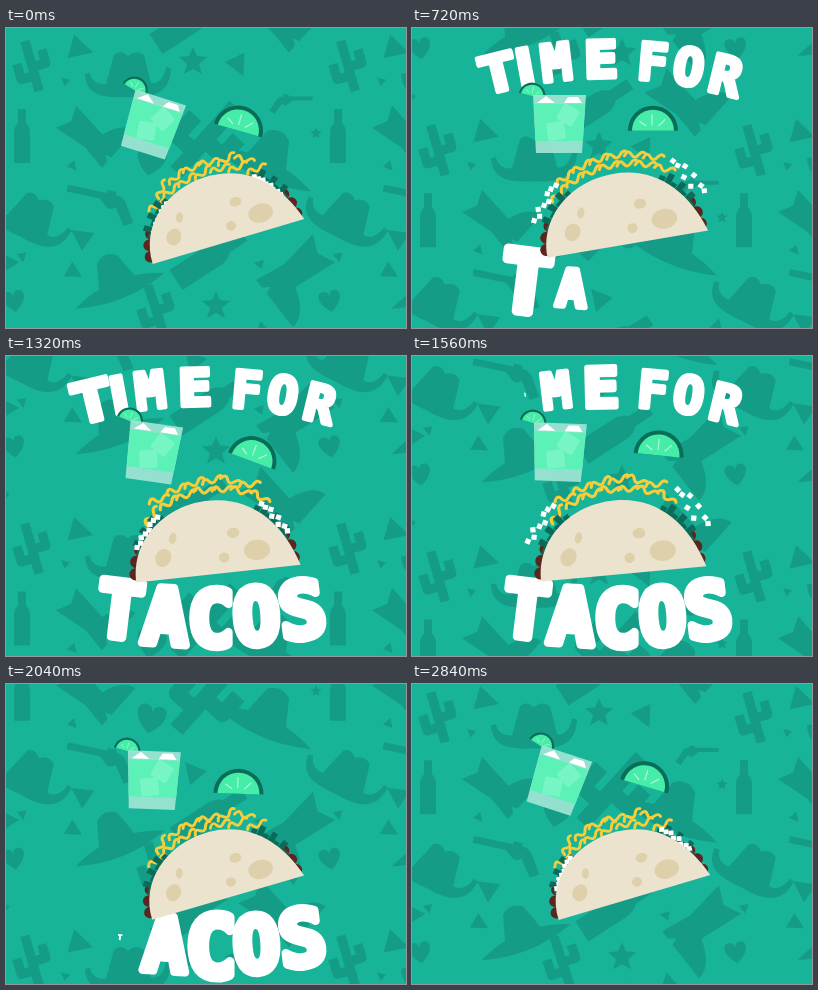
An HTML page for the animation above (2880 ms loop, 400x300 px).

```html
<!DOCTYPE html>
<html lang="en">
<head>
<meta charset="utf-8">
<title>Time for tacos</title>
<style>
html, body { margin: 0; width: 100%; height: 100%; overflow: hidden; background: #18b499; }
svg { display: block; width: 100vw; height: 100vh; }
#pattern { color: #159c86; fill: currentColor; }
#letters text {
  font: 700 50px "DejaVu Sans Mono", "Noto Sans Mono", monospace;
  fill: #fff; stroke: #fff; stroke-linejoin: round; text-anchor: middle;
}
#letters .wide { font-family: "DejaVu Sans", "Open Sans", sans-serif; }
#cheese path { fill: none; stroke: #f5cd3d; stroke-width: 3; stroke-linecap: round; }
</style>
</head>
<body>
<svg viewBox="0 0 400 300">
  <defs>
    <path id="hat" d="M-43 -2C-42 16 -30 23 0 21C30 23 42 14 43 -8L38 -9C36 4 29 8 23 7L16 -21Q8 -27 0 -20Q-8 -27 -14 -21L-22 8C-31 9 -37 4 -38 -3Z"/>
    <path id="sombrero" d="M-48 16Q0 32 48 16Q32 9 19 7L11 -18Q0 -27 -11 -18L-19 7Q-32 9 -48 16Z"/>
    <path id="boot" d="M-15 -35L0 -28L15 -35L11 4Q34 11 36 26H0L-2 20L-6 26H-14L-10 0Z"/>
    <path id="cactus" d="M0 26V-26M0 10H-14V-6M0 1H14V-13" fill="none" stroke="currentColor" stroke-width="9.5" stroke-linejoin="round"/>
    <path id="pistol" d="M-36 -6H4V-9H13V-6Q21 -6 25 1L36 18L27 23L15 6Q10 12 4 6L-2 1H-36Z"/>
    <path id="bottle" d="M-8 27V-3Q-8 -9 -4 -13V-27H4V-13Q8 -9 8 -3V27Z"/>
    <path id="triangle" d="M-13 9L-1 -12L13 10Z"/>
    <path id="heart" d="M0 11C-15 0 -12 -11 -5 -10Q-1 -10 0 -5Q1 -10 5 -10C12 -11 15 0 0 11Z"/>
    <path id="star" d="M0 -14L4 -5L14 -4L6 3L9 13L0 8L-9 13L-6 3L-14 -4L-4 -5Z"/>
    <g id="wedge">
      <path d="M-25 0A25 25 0 0 1 25 0Z" fill="#0a6d58"/>
      <path d="M-21 0A21 21 0 0 1 21 0Z" fill="#45eda8"/>
      <path d="M-7 -5L-13 -9M-1 -6V-16M6 -5L12 -11" stroke="#b5f8d9" stroke-width="1.2" stroke-linecap="round"/>
    </g>
    <g id="filling">
      <g fill="#5b2620">
        <circle cx="69" cy="-31" r="6"/><circle cx="74" cy="-20" r="6"/><circle cx="76" cy="-8" r="6"/>
      </g>
      <g id="lettuce" stroke="#0b6b58" stroke-width="6"></g>
    </g>
    <g id="tile">
      <use href="#cactus" transform="translate(26 38) rotate(-16)"/>
      <use href="#cactus" transform="translate(200 111) rotate(42) scale(1.7)"/>
      <use href="#cactus" transform="translate(150 282) rotate(-18)"/>
      <use href="#hat" transform="translate(122 48)"/>
      <use href="#hat" transform="translate(24 190) rotate(27)"/>
      <use href="#sombrero" transform="translate(108 248) rotate(-22)"/>
      <use href="#sombrero" transform="translate(264 126) rotate(24) scale(1.1)"/>
      <use href="#boot" transform="translate(86 112) rotate(-48)"/>
      <use href="#boot" transform="translate(285 246) rotate(52) scale(1.2)"/>
      <use href="#boot" transform="translate(272 -6) rotate(-48) scale(1.1)"/>
      <use href="#bottle" transform="translate(16 108)"/>
      <use href="#bottle" transform="translate(184 -6) rotate(57) scale(1.5)"/>
      <use href="#bottle" transform="translate(204 230) rotate(57) scale(1.5)"/>
      <use href="#pistol" transform="translate(96 170) rotate(12)"/>
      <use href="#pistol" transform="translate(285 72) scale(-.6 .6)"/>
      <use href="#triangle" transform="translate(72 18) rotate(-14)"/>
      <use href="#triangle" transform="translate(233 34) rotate(35) scale(.9)"/>
      <use href="#triangle" transform="translate(76 212) rotate(185) scale(.9)"/>
      <use href="#triangle" transform="translate(187 189) rotate(200) scale(.9)"/>
      <use href="#triangle" transform="translate(67 242) scale(.7)"/>
      <use href="#triangle" transform="translate(59 54) rotate(190) scale(.35)"/>
      <use href="#triangle" transform="translate(67 137) rotate(20) scale(.4)"/>
      <use href="#triangle" transform="translate(17 228) rotate(50) scale(.4)"/>
      <use href="#triangle" transform="translate(254 237) rotate(160) scale(.4)"/>
      <use href="#heart" transform="translate(8 273) rotate(-10)"/>
      <use href="#heart" transform="translate(145 133) rotate(12) scale(1.35)"/>
      <use href="#star" transform="translate(187 33)"/>
      <use href="#star" transform="translate(210 277)"/>
      <use href="#star" transform="translate(310 105) scale(.4)"/>
    </g>
  </defs>
  <rect width="400" height="300" fill="#18b499"/>
  <g id="pattern"></g>
  <g id="letters"></g>
  <g id="taco">
    <g id="cheese"></g>
    <g transform="translate(-3 0)">
      <use href="#filling"/><use href="#filling" transform="scale(-1 1)"/>
    </g>
    <g id="cubes" fill="#fff"></g>
    <path d="M-79 0C-80 -42 -44 -72 -3 -72C38 -72 66 -44 79 0Z" fill="#ece3cf"/>
    <g fill="#ddd0ab">
      <ellipse cx="-40" cy="-39" rx="3.5" ry="5.5" transform="rotate(16 -40 -39)"/>
      <ellipse cx="-51" cy="-21" rx="7.5" ry="9" transform="rotate(30 -51 -21)"/>
      <ellipse cx="18" cy="-38" rx="6" ry="5"/>
      <circle cx="7" cy="-15" r="5"/>
      <ellipse cx="39" cy="-19" rx="12.5" ry="10"/>
    </g>
  </g>
  <use id="lime" href="#wedge"/>
  <g id="drink">
    <use href="#wedge" transform="translate(-27 -28) rotate(14) scale(.54)"/>
    <path d="M-26 -29H27L23 29H-23Z" fill="#a0e5d5" opacity=".92"/>
    <path d="M-25 -20H26L24 17H-23.5Z" fill="#5cf1b6"/>
    <path d="M-22 -21L-13 -28L-4 -21ZM5 -21L9 -27H19L23 -21Z" fill="#fff"/>
    <g fill="#78f5c4">
      <rect x="-9" y="-9" width="18" height="18" rx="2" transform="translate(9 -9) rotate(30)"/>
      <rect x="-9" y="-9" width="18" height="18" rx="2" transform="translate(-3 7) rotate(-8)"/>
    </g>
  </g>
</svg>
<script>
const LOOP = 2880, BEAT = 960, STEP = 40, TILE_W = 316, TILE_H = 337;
const LETTER_GAP = 80, IN_START = 40, OUT_END = 1480, POP = 240;

const $ = id => document.getElementById(id);
const mix = (a, b, p) => a + (b - a) * p;
const smooth = p => p * p * (3 - 2 * p);
const random = seed => Math.abs(Math.sin(seed * 12.9898) * 43758.5453) % 1;
// Swings 0..1..0 over one period, starting from 0 at `from`.
const swing = (t, from, period) => (1 - Math.cos(2 * Math.PI * (t - from) / period)) / 2;

function add(parent, tag, attrs) {
  const node = document.createElementNS('http://www.w3.org/2000/svg', tag);
  for (const key in attrs) node.setAttribute(key, attrs[key]);
  return parent.appendChild(node);
}
function place(node, x, y, angle = 0, sx = 1, sy = sx) {
  node.setAttribute('transform', `translate(${x} ${y}) rotate(${angle}) scale(${sx} ${sy})`);
}

for (const x of [-TILE_W, 0, TILE_W])
  for (const y of [-TILE_H, 0, TILE_H]) add($('pattern'), 'use', { href: '#tile', x, y });

for (let i = 0; i < 7; i++) {
  const a = 0.4 + i * 0.085, tip = 78 + 6 * (i % 2);
  add($('lettuce'), 'path', {
    d: `M${58 * Math.cos(a)} ${-54 * Math.sin(a)}L${tip * Math.cos(a)} ${-tip * Math.sin(a)}`
  });
}

// The top word pair follows an arch, the lower word a shallow bowl.
const archX = [86, 113, 144, 189, 241, 277, 314];
const letters = [...'TIMEFORTACOS'].map((char, i) => {
  const low = i - archX.length, top = low < 0;
  const x = top ? archX[i] : 114 + 45.5 * low;
  const y = top ? 31 + 0.00115 * (x - 195) ** 2 : 262 - 2.2 * (low - 2) ** 2;
  const size = top ? 51 : 77;
  const node = add($('letters'), 'text', {
    y: size * 0.3645,
    class: top && 'TIE'.includes(char) ? 'wide' : '',
    style: `font-size: ${size}px; stroke-width: ${top ? 4.5 : 8.5}px`
  });
  node.textContent = char;
  return { node, x, y, angle: top ? (x - 200) * 0.12 : 7 - 3.5 * low };
});

// Grows from a speck with a small overshoot.
function popScale(age) {
  if (age < 0) return 0;
  const q = Math.min(1, (age + 5) / (POP + 5)) - 1;
  return 1 + 2.7 * q ** 3 + 1.7 * q ** 2;
}

const cheese = Array.from({ length: 13 }, (_, i) => {
  const x = -58 + i * 8.8;
  return {
    x, y: -77 * Math.sqrt(1 - (x / 88) ** 2) - 9 * (i % 2), slope: x * 0.5,
    turn: 50 * (random(i + 1) - 0.5),
    node: add($('cheese'), 'path', { d: 'M-10 2Q-7 -5 -3.5 0T3.5 0T10 -2' })
  };
});

const cubes = Array.from({ length: 16 }, (_, i) => ({
  side: i % 2 ? 1 : -1,
  angle: 0.44 + 0.065 * (i >> 1),
  reach: 88 + 14 * random(i + 5),
  spin: 60 * random(i + 9),
  node: add($('cubes'), 'rect', { x: -2.5, y: -2.5, width: 5, height: 5 })
}));

function draw(t) {
  const beat = t % BEAT;
  const level = smooth(swing(beat, 20, BEAT));
  const toss = swing(beat, 140, BEAT);
  const kick = (1 - swing(beat, -25, BEAT / 2)) ** 2;

  place($('pattern'), 0, TILE_H * t / LOOP);

  letters.forEach(({ node, x, y, angle }, i) => {
    const delay = LETTER_GAP * i;
    place(node, x, y, angle, popScale(Math.min(t - IN_START - delay, OUT_END + delay - t)));
  });

  place($('taco'), mix(222.5, 211.5, level), mix(213.5, 218, level),
    mix(-16.6, -5, level), mix(1, 1.05, level), mix(0.95, 1.03, level));
  place($('lime'), mix(232, 247, level),
    mix(111, 97, level) + kick * mix(-9, 18, level), kick * mix(17, 50, level));
  place($('drink'), 147 - 1.5 * kick, 96 + kick, 18.5 * kick);

  for (const { node, x, y, slope, turn } of cheese)
    place(node, x, y - 6 * level, slope + turn * mix(1, -1, level));

  for (const { node, side, angle, reach, spin } of cubes) {
    const r = mix(68, reach, toss);
    place(node, side * r * Math.cos(angle) - 3, -r * Math.sin(angle), spin * toss);
  }
}

const start = performance.now();
function tick() {
  const t = (performance.now() - start) % LOOP;
  draw(Math.floor(t / STEP) * STEP);
  requestAnimationFrame(tick);
}
tick();
</script>
</body>
</html>
```
